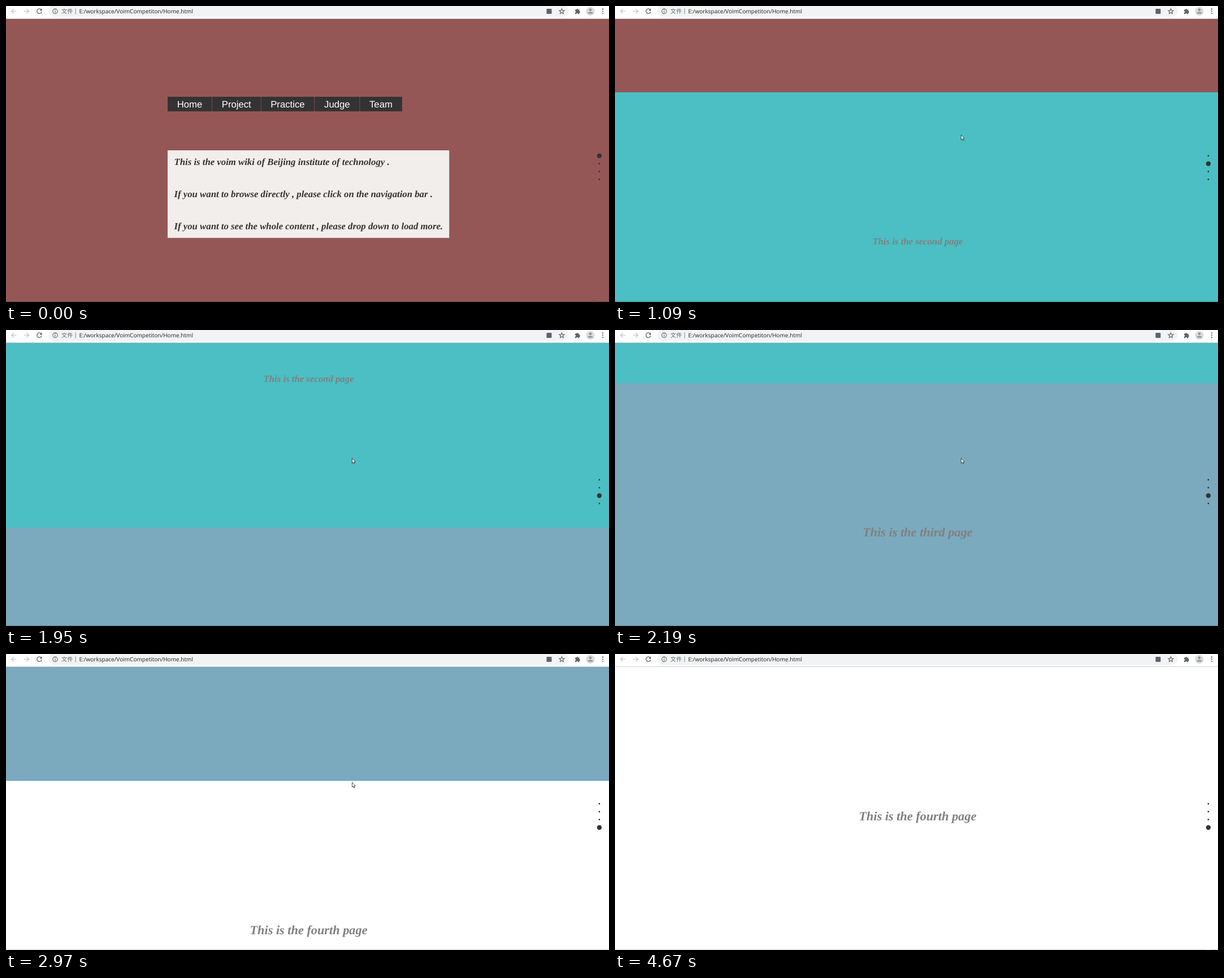
Write an HTML page that moves like this. It is 1067x525 px and loops after 4.76 s.

```html
<!DOCTYPE html>
<html lang="en">
<head>
<meta charset="utf-8">
<title>Page scroll</title>
<style>
html, body { margin: 0; width: 100%; height: 100%; overflow: hidden; background: #fff; }
svg { display: block; width: 1067px; height: 525px; text-rendering: geometricPrecision; }
.nav { font: 16.73px "Liberation Sans", Arial, sans-serif; fill: #fff; }
.note { font: italic bold 16.75px "Liberation Serif", "Times New Roman", serif; fill: #333; }
.head { font: italic bold 22.3px "Liberation Serif", "Times New Roman", serif; fill: gray; text-anchor: middle; }
.url { font: 10.05px "Open Sans", sans-serif; fill: #202124; }
.cjk { font: 10.2px "Noto Sans CJK SC", "Noto Sans CJK", sans-serif; fill: #5f6368; }
.line { fill: none; stroke: #5f6368; stroke-width: 1.1; }
.icon { fill: #5f6368; }
</style>
</head>
<body>
<svg viewBox="0 0 1067 525" xmlns="http://www.w3.org/2000/svg">
  <g id="pages"></g>
  <g id="dots" fill="#333"></g>
  <g id="chrome">
    <rect width="1067" height="22" fill="#fff"/>
    <rect y="22" width="1067" height="1" fill="#cfcfcf"/>
    <rect x="75" y="-1" width="921" height="20" rx="10" fill="#f1f3f4"/>
    <path class="line" style="stroke:#babcbe" d="M18.5 9.3H10M14 5.2L9.9 9.3L14 13.4M32 9.3H40.5M36.5 5.2L40.6 9.3L36.5 13.4"/>
    <path class="line" style="stroke-width:1.3" d="M62.3 6.5A4.2 4.2 0 1 0 63.1 10.3"/>
    <path class="icon" d="M63.6 4.3V8.5H59.4Z"/>
    <circle class="line" cx="87" cy="9.3" r="4.2"/>
    <path class="icon" d="M86.4 8.7h1.2v3h-1.2zM86.4 6.6h1.2v1.2h-1.2z"/>
    <text class="cjk" x="98" y="13">文件</text>
    <rect x="122.6" y="4.5" width="1" height="10" fill="#80868b"/>
    <text class="url" x="129.5" y="13">E:/workspace/VoimCompetiton/Home.html</text>
    <rect class="icon" x="956.5" y="5" width="9" height="9" rx="1"/>
    <path class="icon" d="M1007 6.5h2.2a1.5 1.5 0 0 1 3 0h2.3v2.4a1.5 1.5 0 0 1 0 3v2.3h-2.4a1.4 1.4 0 0 0-2.8 0H1007v-2.5a1.4 1.4 0 0 0 0-2.8z"/>
    <circle cx="1034" cy="9.3" r="7.6" fill="#dadbdd"/>
    <circle cx="1034" cy="6.8" r="2.3" fill="#929497"/>
    <path d="M1029.5 13.5q0-3 4.5-3t4.5 3z" fill="#929497"/>
  </g>
  <rect y="524" width="1067" height="1" fill="#000" fill-opacity=".2"/>
  <rect id="glow" x="1046" y="524" width="8" height="1" fill="#f5f58c"/>
  <path id="cursor" d="M.5 .5V9.3L2.5 7.5L3.8 10.5L5.1 9.9L3.9 7H6.4Z" fill="#fff" stroke="#222" stroke-width=".8" stroke-linejoin="round"/>
</svg>
<script>
const LOOP = 4760, STEP = LOOP / 61, LEAD = 15;   // screen refreshes 61 times per loop
const TOP = 23, PAGE = 528, SCROLL = 700;
const starts = [774, 1785, 2715];

// Pointer: time, x, y
const trail = [
  [0, 1037.5, 522], [465, 547, 220], [700, 612, 229], [1610, 612, 227],
  [3230, 612, 227], [3435, 688, 261], [3820, 949, 478], [4210, 1039, 515],
  [4450, 1045, 523], [4530, 1045, 540]
];

const $ = id => document.getElementById(id);
const clamp = v => Math.max(0, Math.min(1, v));

function add(parent, tag, attrs, text) {
  const el = document.createElementNS("http://www.w3.org/2000/svg", tag);
  for (const k in attrs) el.setAttribute(k, attrs[k]);
  if (text) el.textContent = text;
  parent.appendChild(el);
  return el;
}

const pages = $("pages");
["#955656", "#4bbfc3", "#7baabe", "#fff"].forEach((fill, i) =>
  add(pages, "rect", { y: i * PAGE, width: 1067, height: PAGE + 1, fill }));

["second", "third", "fourth"].forEach((word, i) => {
  const size = i ? 22.3 : 16.75;
  const y = (i + 1.5) * PAGE + size * 0.3375;
  add(pages, "text", { x: 535.5, y, class: "head", style: `font-size:${size}px` }, `This is the ${word} page`);
});

let left = 286;
const pad = 16.73;
for (const label of ["Home", "Project", "Practice", "Judge", "Team"]) {
  const box = add(pages, "rect", { x: left, y: 138, height: 25.8, fill: "#333" });
  const text = add(pages, "text", { x: left + pad, y: 156.8, class: "nav" }, label);
  const width = text.getComputedTextLength() + 2 * pad;
  box.setAttribute("width", width + 0.2);
  left += width + 0.95;
}

add(pages, "rect", { x: 286, y: 233, width: 498.3, height: 155.3, fill: "#f2eeeb" });
[
  "This is the voim wiki of Beijing institute of technology .",
  "If you want to browse directly , please click on the navigation bar .",
  "If you want to see the whole content , please drop down to load more."
].forEach((s, i) => add(pages, "text", { x: 297.5, y: 259.2 + i * 57, class: "note" }, s));

const dots = [0, 1, 2, 3].map(i => add($("dots"), "circle", { cx: 1049.9, cy: 265.7 + i * 14 }));

for (let i = -1; i <= 1; i++)
  add($("chrome"), "circle", { cx: 1056, cy: 9.3 + i * 3.8, r: 1.15, class: "icon" });

const star = Array.from({ length: 10 }, (_, i) => {
  const a = (i / 5 - 0.5) * Math.PI, r = i % 2 ? 2.1 : 4.9;
  return [983.5 + r * Math.cos(a), 9.6 + r * Math.sin(a)];
});
add($("chrome"), "polygon", { points: star.join(" "), class: "line" });

// Cubic bezier (.25, .1, .25, 1), solved by bisection
function ease(p) {
  if (p <= 0 || p >= 1) return clamp(p);
  let lo = 0, hi = 1;
  for (let i = 0; i < 24; i++) {
    const s = (lo + hi) / 2;
    if (0.75 * s * (1 - s) + s ** 3 < p) lo = s; else hi = s;
  }
  const s = lo, q = 1 - s;
  return 0.3 * s * q * q + 3 * s * s * q + s ** 3;
}

function pointer(t) {
  let i = 0;
  while (i < trail.length - 2 && t >= trail[i + 1][0]) i++;
  const [t0, x0, y0] = trail[i], [t1, x1, y1] = trail[i + 1];
  const p = clamp((t - t0) / (t1 - t0));
  return [x0 + (x1 - x0) * p, y0 + (y1 - y0) * p];
}

function draw(now) {
  const t = Math.floor((now % LOOP + LEAD) / STEP) % 61 * STEP;

  const scroll = starts.reduce((sum, s) => sum + ease((t - s) / SCROLL), 0) * PAGE;
  pages.setAttribute("transform", `translate(0 ${(TOP - scroll).toFixed(2)})`);

  const grow = s => { const p = clamp((t - s) / 100); return p * p * (3 - 2 * p); };
  dots.forEach((dot, i) => {
    const on = i ? grow(starts[i - 1]) : 1;
    const off = i < 3 ? grow(starts[i]) : 0;
    dot.setAttribute("r", 1.4 + 2.8 * (on - off));
  });

  const [x, y] = pointer(t);
  $("cursor").setAttribute("transform", `translate(${x.toFixed(1)} ${y.toFixed(1)})`);
  $("glow").setAttribute("visibility", t > LOOP - 1.5 * STEP ? "visible" : "hidden");
}

const begin = performance.now();
function loop() {
  draw(performance.now() - begin);
  requestAnimationFrame(loop);
}
loop();
</script>
</body>
</html>
```
